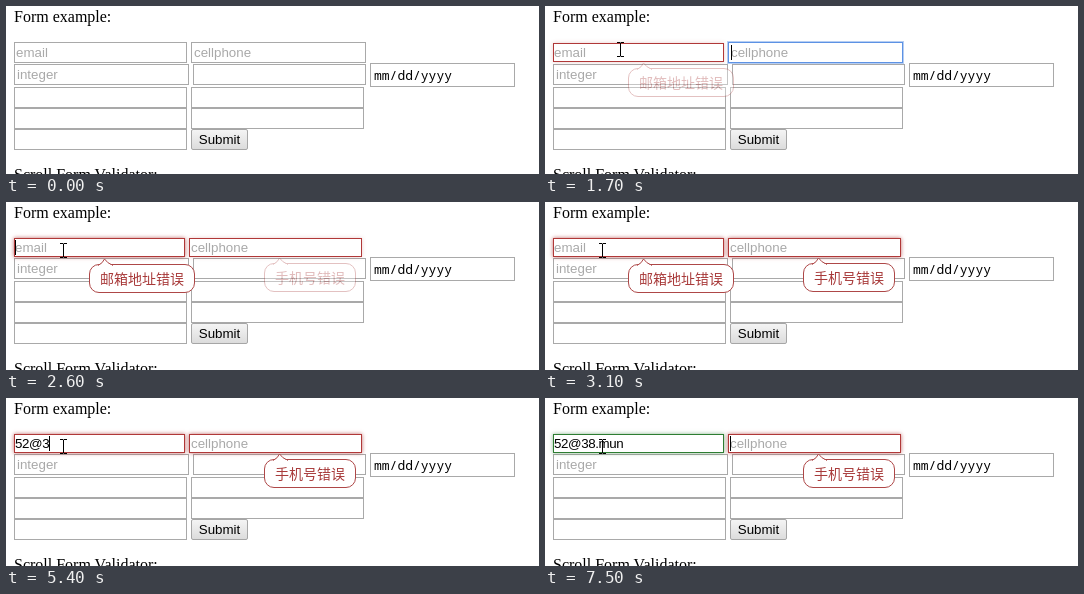
An HTML page that plays this animation: 533 by 168 pixels, repeating every 8 s.

```html
<!DOCTYPE html>
<html lang="en">
<head>
<meta charset="utf-8">
<title>Form example</title>
<style>
html, body { margin: 0; width: 100%; height: 100%; overflow: hidden; background: #fff; }
body { position: relative; font: 16px/18px "Liberation Serif", "Times New Roman", serif; color: #000; }
body > *, #rest > * { position: absolute; box-sizing: border-box; white-space: pre; }
#rest { inset: 0; }
.field { height: 21px; border: 1px solid #a9a9a9; padding: 2px; color: #a9a9a9;
  font: 13.333px/15px "Liberation Sans", Arial, sans-serif; }
.typed { color: #000; letter-spacing: -.4px; }
.caret { position: absolute; width: 1px; height: 15px; background: #000; }
#date { left: 364px; top: 57px; width: 145px; height: 24px; border: 1px solid #a9a9a9;
  padding-left: 3px; font: 13px/23px "Noto Sans Mono", "DejaVu Sans Mono", monospace; }
#submit { left: 185px; top: 123px; width: 57px; height: 21px; border: 1px solid #a6a6a6; border-radius: 2px;
  background: linear-gradient(#f4f4f4, #dcdcdc); text-align: center;
  font: 13.333px/19px "Liberation Sans", Arial, sans-serif; }
.tip { height: 29px; border: 1px solid #ae4747; border-radius: 10px; background: #fff; color: #a83a3a;
  padding: 0 10px; font: 14px/27px "Noto Sans CJK SC", "Noto Sans CJK", sans-serif; }
.tip svg { position: absolute; left: 7px; top: -7px; fill: #fff; stroke: #ae4747; }
</style>
</head>
<body>
<div style="left:8px;top:2px">Form example:</div>
<div id="rest">
  <div id="date">mm/dd/yyyy</div>
  <div id="submit">Submit</div>
  <div style="left:8px;top:160px">Scroll Form Validator:</div>
</div>
<div id="email" class="field"><span></span><i class="caret"></i></div>
<div id="cell" class="field"><span>cellphone</span><i class="caret"></i></div>
<div id="tipEmail" class="tip" style="left:83px;top:62px;width:106px">邮箱地址错误</div>
<div id="tipCell" class="tip" style="left:258px;top:61px;width:92px">手机号错误</div>
<svg id="beam" width="7" height="15" fill="none" stroke="#000"><path d="M0 .5H3L3.5 1L4 .5H7M3.5 1V14M0 14.5H3L3.5 14L4 14.5H7"/></svg>
<svg id="arrow" width="12" height="19"><path d="M.5 .5V16.2L4.2 12.8L6.6 18.4L9 17.4L6.6 11.8H11.5Z" fill="#fff" stroke="#000"/></svg>
<script>
const LOOP = 8000, ADDRESS = "52@38.mun";
const KEYS = [4400, 4600, 5000, 5400, 5500, 6300, 6400, 6500, 6600];
const FOCUS = [700, 1700, 2600, 7500];
const BLINK = [...FOCUS, ...KEYS].sort((a, b) => a - b);
const RED = [176, 56, 56], GREEN = [45, 125, 50];
const $ = id => document.getElementById(id);
const clamp = x => Math.max(0, Math.min(1, x));
const mix = (a, b, k) => a + (b - a) * k;

// Static fields: left, top, width, placeholder
[[8, 58, 175, "integer"], [187, 58, 173], [8, 81, 173], [185, 81, 173],
 [8, 102, 173], [185, 102, 173], [8, 123, 173]].forEach(([x, y, w, text = ""]) => {
  const div = document.createElement("div");
  div.className = "field";
  div.textContent = text;
  div.style.cssText = `left:${x}px;top:${y}px;width:${w}px`;
  $("rest").append(div);
});

for (const tip of document.querySelectorAll(".tip"))
  tip.insertAdjacentHTML("beforeend", '<svg width="18" height="8"><path d="M1 7.5Q6 5 7.5 1Q10 5 16 7.5" /><path d="M2 7.5H15" stroke="#fff"/></svg>');

function place(el, x, y) {
  el.style.left = x + "px";
  el.style.top = y + "px";
}

// Checked fields lose one pixel of border on every side.
function drawField(el, { x, y, w, pad, checked, focused, color, glow, caret }) {
  const rgb = color.map(Math.round).join();
  place(el, x, y);
  Object.assign(el.style, {
    width: w - (checked ? 2 : 0) + "px",
    height: checked ? "19px" : "21px",
    padding: checked ? `1px ${pad}px` : `2px ${pad + 1}px`,
    borderColor: checked ? `rgb(${rgb})` : focused ? "#5d92e4" : "#a9a9a9",
    boxShadow: checked ? `0 0 4px rgba(${rgb},${glow})` : focused ? "0 0 0 1px rgba(93,146,228,.45)" : "none"
  });
  el.querySelector(".caret").style.display = caret ? "" : "none";
}

function draw(t) {
  const emailBad = t >= 1700, cellBad = t >= 2600;
  const fade = start => clamp((t - start + 100) / 300);
  const count = KEYS.filter(k => k <= t).length;
  const last = BLINK.filter(b => b <= t).pop();
  const lit = last !== undefined && (t - last) % 1000 < 500;
  const focus = FOCUS.filter(f => f <= t).length;
  const onEmail = focus === 1 || focus === 3, onCell = focus === 2 || focus === 4;
  const valid = clamp((t - 6300) / 300);

  const text = $("email").firstChild;
  text.textContent = count ? ADDRESS.slice(0, count) : "email";
  text.className = count ? "typed" : "";
  const emailCaret = $("email").lastChild;
  emailCaret.style.left = count ? "" : (emailBad ? 0 : 1) + "px";
  $("cell").lastChild.style.left = (cellBad ? 1 : 2) + "px";

  drawField($("email"), {
    x: 8, y: emailBad && !cellBad ? 37 : 36, w: 173, pad: 0, checked: emailBad, focused: onEmail,
    color: RED.map((c, i) => mix(c, GREEN[i], valid)),
    glow: (t < 5500 ? .75 : .55) * fade(1700), caret: onEmail && lit
  });
  drawField($("cell"), {
    x: emailBad ? 183 : 185, y: 36, w: 175, pad: 1, checked: cellBad, focused: onCell,
    color: RED, glow: .75 * fade(2600), caret: onCell && lit
  });
  $("rest").style.top = cellBad ? "-2px" : "0";
  $("tipEmail").style.opacity = t < 5400 ? fade(1700) * emailBad : 0;
  $("tipCell").style.opacity = fade(2600) * cellBad;

  const arrow = t >= 100 && t < 600;
  const k = clamp((t - 100) / 400), ease = k * k * (3 - 2 * k);
  $("arrow").style.display = arrow ? "" : "none";
  place($("arrow"), Math.round(mix(439, 97, ease)), Math.round(mix(23, 27, ease)));
  const move = clamp((t - 2100) / 200);
  $("beam").style.display = t >= 600 ? "" : "none";
  place($("beam"), mix(72, 54, move), Math.round(mix(36, 41, move)));
}

const start = performance.now();
function tick() {
  const t = (performance.now() - start) % LOOP;
  draw(Math.floor(t / 100) * 100);
  requestAnimationFrame(tick);
}
tick();
</script>
</body>
</html>
```
